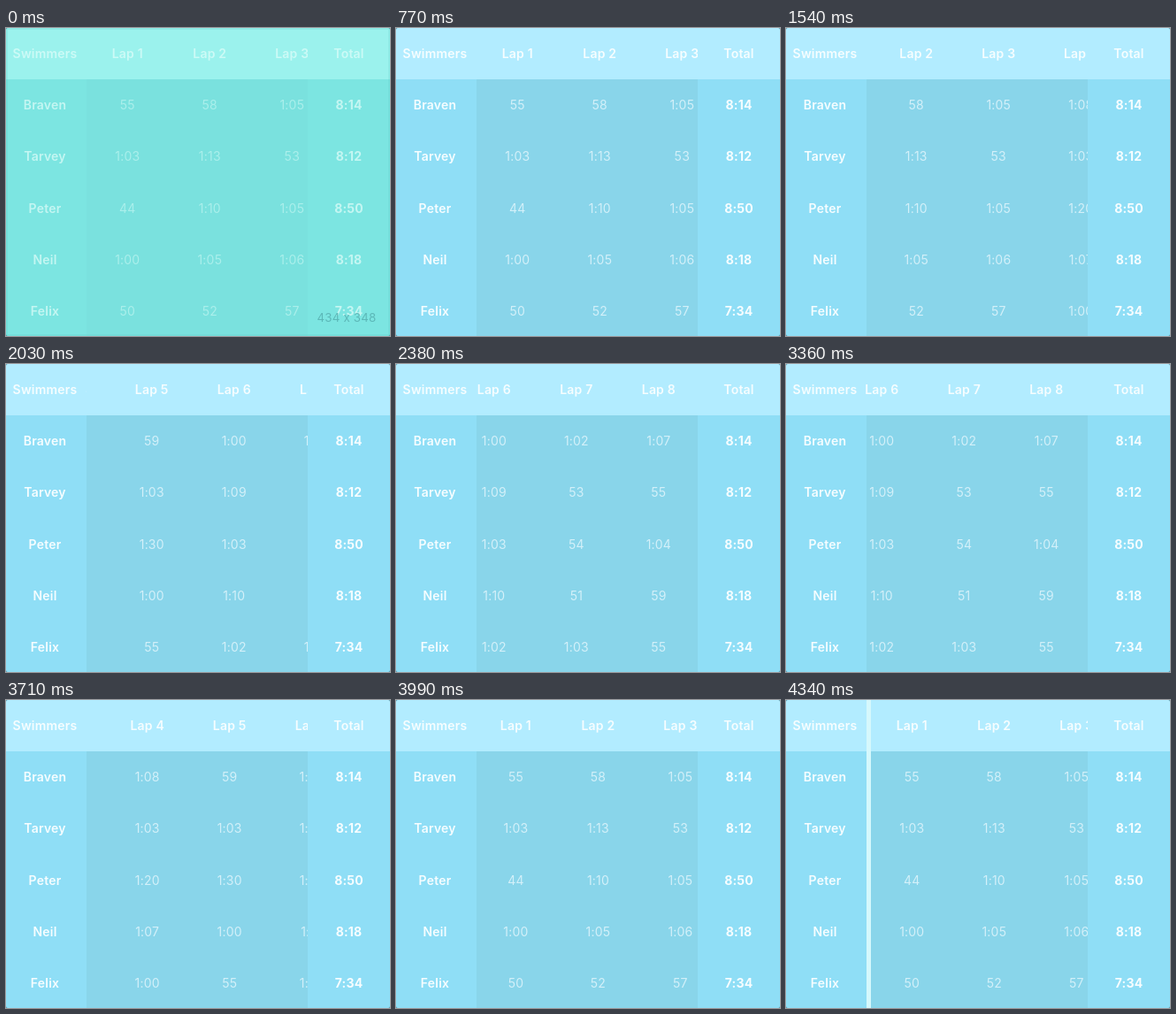
An HTML page with a canvas for the animation above (4.41 s loop, 434 px wide and 348 px high).

```html
<!DOCTYPE html>
<html lang="en">
<head>
<meta charset="utf-8">
<title>Swim laps</title>
<style>
  html, body { margin: 0; width: 100%; height: 100%; overflow: hidden; background: #4b8798; }
  canvas { display: block; width: 434px; height: 348px; border-radius: 2px; }
</style>
</head>
<body>
<canvas id="stage" width="434" height="348"></canvas>
<script>
const ctx = document.getElementById('stage').getContext('2d');
const W = 434, H = 348, HEAD = 58, LEFT = 91, RIGHT = 341;
const COL = 93, MAX = 494, LOOP = 4410, FADE = 280;

const rows = [
  ['Swimmers', ...Array.from({ length: 8 }, (_, i) => `Lap ${i + 1}`), 'Total'],
  ...[
    'Braven 55 58 1:05 1:08 59 1:00 1:02 1:07 8:14',
    'Tarvey 1:03 1:13 53 1:03 1:03 1:09 53 55 8:12',
    'Peter 44 1:10 1:05 1:20 1:30 1:03 54 1:04 8:50',
    'Neil 1:00 1:05 1:06 1:07 1:00 1:10 51 59 8:18',
    'Felix 50 52 57 1:00 55 1:02 1:03 55 7:34'
  ].map(line => line.split(' '))
];

// Cubic between two keys of [time, position, velocity]
function glide(t, [t0, p0, v0], [t1, p1, v1]) {
  const d = t1 - t0, u = (t - t0) / d, w = 1 - u;
  return w * w * ((1 + 2 * u) * p0 + u * d * v0) + u * u * ((3 - 2 * u) * p1 - w * d * v1);
}

// Rubber-band overshoot after hitting an edge at the given speed
const bounce = (t, speed) => speed * t * Math.exp(-t / 100);

function scrollAt(t) {
  const start = [1190, 0, 0], mid = [2030, 344, 0.55], end = [2390, MAX, 0.28];
  const back = [3380, MAX, 0], home = [3995, 0, -0.46];
  if (t < start[0]) return 0;
  if (t < mid[0]) return glide(t, start, mid);
  if (t < end[0]) return glide(t, mid, end);
  if (t < back[0]) return MAX + bounce(t - end[0], end[2]);
  if (t < home[0]) return glide(t, back, home);
  return bounce(t - home[0], home[2]);
}

function mix(a, b, k) {
  return `rgb(${a.map((v, i) => Math.round(v + (b[i] - v) * k))})`;
}

function box(color, x, y, w, h) {
  ctx.fillStyle = color;
  ctx.fillRect(x, y, w, h);
}

function write(text, x, y, weight, color, size = 14) {
  ctx.font = `${weight} ${size}px Inter, sans-serif`;
  ctx.fillStyle = color;
  ctx.fillText(text, x, y);
}

function draw(t) {
  const tint = Math.max(0, 1 - t / FADE);
  const scroll = scrollAt(t);
  const head = mix([178, 236, 255], [155, 242, 237], tint);
  const side = mix([143, 222, 246], [124, 229, 225], tint);
  const body = mix([137, 213, 234], [122, 225, 222], tint);
  const title = mix([246, 253, 255], [204, 250, 246], tint);
  const bold = mix([246, 253, 255], [196, 246, 242], tint);
  const thin = mix([211, 240, 249], [170, 239, 235], tint);
  const baseline = i => 34 + i * 58.2;

  ctx.textAlign = 'center';
  ctx.letterSpacing = '0.2px';
  box(side, 0, 0, W, H);
  box(head, 0, 0, W, HEAD);

  ctx.save();
  ctx.beginPath();
  ctx.rect(LEFT - 1, 0, RIGHT - LEFT + 1, H);
  ctx.clip();
  box(body, LEFT, HEAD, RIGHT - LEFT, H - HEAD);
  rows.forEach((row, i) => {
    for (let lap = 1; lap <= 8; lap++) {
      const x = 137.3 + (lap - 1) * COL - scroll;
      write(row[lap], x, baseline(i), i ? 400 : 600, i ? thin : title);
    }
  });
  const gap = 'rgb(213,248,252)';
  if (scroll < 0) box(gap, LEFT, 0, -scroll, H);
  if (scroll > MAX) box(gap, RIGHT - scroll + MAX, 0, scroll - MAX, H);
  ctx.restore();

  rows.forEach((row, i) => {
    const color = i ? bold : title;
    write(row[0], 44, baseline(i), 600, color);
    write(row[9], 387.5, baseline(i), i ? 700 : 600, color);
  });

  if (tint) {
    ctx.globalAlpha = tint;
    write('434 x 348', 385, 332, 400, 'rgb(92,184,184)', 13.3);
    ctx.strokeStyle = 'rgba(90,200,195,.2)';
    ctx.lineWidth = 4;
    ctx.strokeRect(0, 0, W, H);
    ctx.globalAlpha = 1;
  }
}

const begin = performance.now();
function tick() {
  draw((performance.now() - begin) % LOOP);
  requestAnimationFrame(tick);
}
tick();
</script>
</body>
</html>
```
